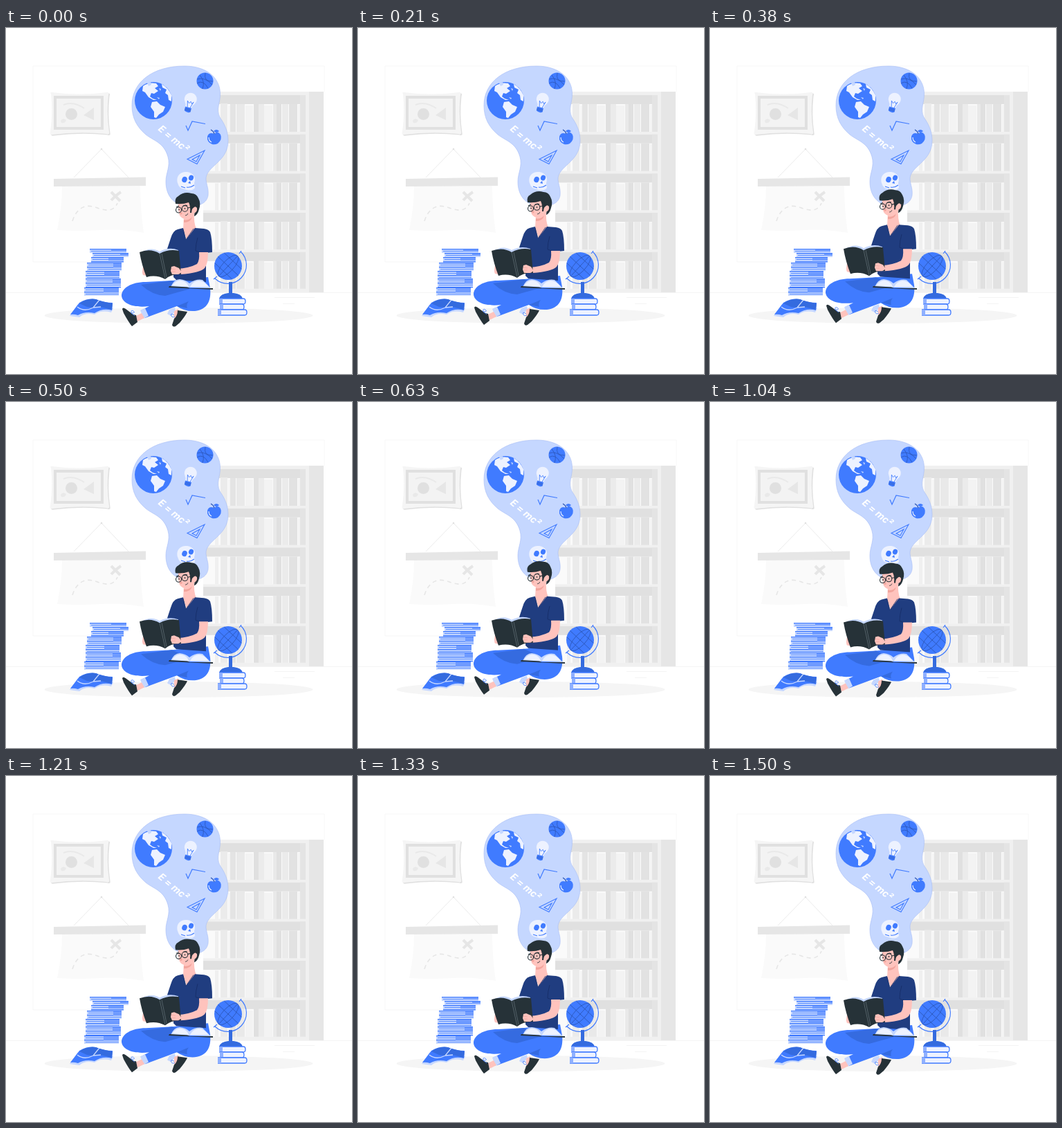
Animation, 500 px wide and 500 px high, one loop 1540 ms. Source, as an HTML page:

```html
<!DOCTYPE html>
<html lang="en">
<head>
<meta charset="utf-8">
<title>Reading</title>
<style>
  html, body { margin: 0; width: 100%; height: 100%; overflow: hidden; background: #fff; }
  svg { display: block; width: 100%; height: 100%; }
  .b { fill: #407bff; } .l { fill: #c5d7ff; } .d { fill: #263238; }
  .s { fill: #ffc3bd; } .n { fill: #203d80; } .w { fill: #edf2ff; }
  .line { fill: none; stroke: #407bff; }
  .ink { fill: none; stroke: #263238; }
</style>
</head>
<body>
<svg viewBox="0 0 500 500">
  <!-- room -->
  <path d="M39 338V55H460V92M39 338H118" fill="none" stroke="#f7f7f7"/>
  <path d="M0 382.500H500M388 389.500H446M400 398.500H417" stroke="#f0f0f0" stroke-width=".7"/>
  <ellipse cx="249.500" cy="415.500" rx="194" ry="11.500" fill="#f5f5f5"/>
  <g id="shelf"></g>

  <!-- framed picture -->
  <path id="frame" d="M65 95Q63 92 67 93Q106 98 145 93Q150 92 148 97Q145 124 149 150Q150 155 145 153Q106 149 68 154Q62 155 64 150Q68 124 65 95Z" fill="#e0e0e0" transform="translate(1.500 1.500)"/>
  <use href="#frame" x="-1.500" y="-1.500" style="filter:brightness(1.095)"/>
  <path d="M69 98H141V147H69Z" fill="#e0e0e0"/>
  <path d="M73 102H137V143H73Z" fill="#f3f3f3"/>
  <circle cx="94.500" cy="124.500" r="8.500" fill="#e0e0e0"/>
  <path d="M112 126L127 115V133Z" fill="#e6e6e6"/>
  <path d="M83 111Q97 105 113 116" fill="none" stroke="#e9e9e9" stroke-width="2"/>
  <path d="M79 134Q82 129 87 133Q86 138 80 137Z" fill="#e9e9e9"/>

  <!-- hanging map -->
  <path d="M98 216L138 175L177 216" fill="none" stroke="#e6e6e6" stroke-width=".8"/>
  <circle cx="138" cy="175" r="1.300" fill="#e0e0e0"/>
  <path d="M81 228H194Q194 262 199 296Q168 290 137 292Q104 294 74 292Q81 260 81 228Z" fill="#fafafa"/>
  <path d="M69 218L202 215.500V228L69 229Z" fill="#e6e6e6"/>
  <path d="M96 279C103 257 118 255 129 259S155 268 161 253" fill="none" stroke="#e6e6e6" stroke-width="1.600" stroke-dasharray="6 5"/>
  <path d="M152 237Q158 243 165 250M166 237Q158 242 152 249" stroke="#e6e6e6" stroke-width="4" fill="none"/>

  <!-- thought cloud -->
  <path d="M258 55C290 55 309 72 309.500 94C310 109 303 116 309 129C316 139 321 149 321 163C321 194 288 200 289 219C290 228 293 232 292 242C290 255 275 259 260 257C241 255 231 241 231 222C231 209 238 200 234 186C228 165 213 163 202 154C189 143 182 130 182 112C182 78 212 55 258 55Z" fill="#c5d7ff" stroke="#a6bdf5" stroke-width=".6"/>
  <circle class="b" cx="213" cy="105" r="27"/>
  <path class="w" d="M198 84Q206 78 217 80L220 84L215 87L220 91L214 95L210 94L208 99L212 102L218 104L213 104L206 100L201 93L197 91ZM225 81Q234 86 239 97L239 106L235 104L234 97L230 94L232 89L226 86ZM211 107L218 106L223 111L230 114L227 121L221 125L217 130L214 129V121L209 114Z"/>
  <path class="l" d="M204 79L209 78L210 82L206 84ZM221 87L224 88L223 91ZM218 100L222 101L221 103Z"/>
  <circle class="b" cx="287.500" cy="76.500" r="12"/>
  <path d="M276 74Q287 70 298 82M280 68Q288 77 284 88M288 65Q285 78 299 77M276 80Q285 74 292 87" fill="none" stroke="#2c56b5" stroke-width=".8"/>
  <g transform="rotate(14 266 107)">
    <path class="w" d="M261 115Q261 111 258.500 108A9 9 0 1 1 273 108Q270 111 270 115Z"/>
    <path class="b" d="M261 115H270V121Q266 124 261 121Z"/>
    <path class="line" d="M264 115L262 106L265 109L267 106L269 109L271 106L268 115" stroke-width=".8"/>
    <path d="M261 117.500H270M261 119.500H270" stroke="#2c56b5" stroke-width=".6"/>
  </g>
  <path class="line" d="M260 141L263 148L269 135L288 138.500" stroke-width="1.200"/>
  <path class="b" d="M301 153Q306 148 310 154Q313 161 306 167Q302 169 298 168Q290 165 291 157Q293 150 301 153Z"/>
  <path d="M301 153Q300 149 296 147" fill="none" stroke="#2c56b5" stroke-width="1.300"/>
  <path class="b" d="M300 149Q304 145 308 149Q304 153 300 149Z"/>
  <path d="M293 158Q293 163 297 165" fill="none" stroke="#edf2ff" stroke-width="1.200"/>
  <path class="line" d="M262 189.500L287 177L276 196.500ZM269 190L280 184L275 193Z" stroke-width="1.100"/>
  <text x="0" y="0" transform="translate(219 147) rotate(40)" fill="#fff" font-family="Inter, Arial, sans-serif" font-size="14" font-weight="700" font-style="italic">E = mc²</text>
  <path class="w" d="M248 224C245 212 254 207 262 208C271 209 275 217 272 224L273 231Q269 236 261 234L252 231Q249 228 248 224Z"/>
  <g class="b">
    <ellipse cx="258" cy="219" rx="3.700" ry="4.300" transform="rotate(20 258 219)"/>
    <ellipse cx="267.500" cy="216.500" rx="3.500" ry="4" transform="rotate(20 267.500 216.500)"/>
    <path d="M263 224L266 221L267 225Z"/>
  </g>
  <path class="line" d="M253 229L259 231M261 230Q267 231 272 227" stroke-width="1.100"/>

  <!-- books on the floor -->
  <g id="stack"></g>
  <path class="l" d="M92 416L104 399Q113 406 124 401L155 405L152 411Q138 407 128 414Q114 411 106 418Z"/>
  <path class="b" d="M93 414L106 397Q118 390 130 392Q142 397 154 397L153 408Q140 404 128 412Q114 409 104 415Q98 413 93 414Z"/>
  <path d="M106 398Q118 390 130 392Q136 395 154 398L153 407L136 403L125 404L117 403Z" fill="#346bdf"/>
  <path d="M103 403Q113 411 126 404L137 403M126 404L135 393" fill="none" stroke="#c5d7ff" stroke-width="1.300"/>

  <!-- globe -->
  <path class="line" d="M339 323A25.500 25.500 0 0 1 302 362M337 326L340 322M300 363L305 359" stroke-width="1.200"/>
  <path d="M322 367H327V386H322Z" fill="#346bdf"/>
  <circle class="b" cx="321" cy="344" r="20"/>
  <g fill="none" stroke="#2c56b5" stroke-width=".8" transform="rotate(43 321 344)">
    <ellipse cx="321" cy="344" rx="8" ry="20"/>
    <path d="M321 324V364M301 344H341M304 334H338M304 354H338"/>
  </g>
  <path d="M308 391Q310 384 321 383H329Q340 384 342 391Z" fill="#346bdf"/>
  <g id="pile"></g>

  <!-- reader -->
  <g id="man">
    <path class="s" d="M198 345L204 348L203 358L198 357Q196 354 198 345Z"/>
    <path class="s" d="M257 273L272 265Q271 282 275 290L262 308L256 291Z"/>
    <path d="M257 277Q263 279 269 273Q267 281 257 281Z" fill="#f2a59d"/>
    <path class="s" d="M249 252Q248 264 251 271Q255 277 262 276Q269 275 272 267Q279 268 278 260Q276 248 264 247Z"/>
    <path class="d" d="M245 254Q243 246 249 243Q257 236 268 239Q275 239 278 246Q282 253 279 262Q277 270 272 272L273 262Q269 257 268 267L266 267Q267 258 264 252Q256 255 245 254Z"/>
    <path class="s" d="M270 261Q273 256 276 260Q277 266 271 268Z"/>
    <g class="ink" stroke-width="1.100">
      <circle cx="249.500" cy="263" r="4"/><circle cx="258.500" cy="261" r="4.300"/>
      <path d="M262.500 260L272 258M256 257.500Q259 255 262 257M246 259L250 257"/>
      <path d="M259 271Q262 271 263 268" stroke-width=".8"/>
    </g>
    <circle class="d" cx="250" cy="262.500" r=".9"/><circle class="d" cx="258.500" cy="261" r=".9"/>
    <circle cx="253" cy="268" r="1.600" fill="#f2a59d"/>

    <path class="b" d="M240 365L202 367C181 367 167 376 167 387C168 398 184 405 207 402L195 408L201 419L247 402Q258 410 273 409C291 407 297 394 295 376L292 360Z"/>
    <path d="M195 371L240 365L266 377L230 387Q211 386 195 371ZM247 402L264 395Q260 400 262 405Z" fill="#356be0"/>
    <path class="l" d="M194 408L201 405L206 416L199 420ZM236 407L244 404L245 409L238 416L233 413Z"/>
    <path class="s" d="M188 416L196 412L200 419L190 424ZM243 409L249 406L250 413L243 420Z"/>
    <path class="d" d="M168 406Q169 403 173 406L181 412Q184 415 188 415L190 425L182 431Q177 425 170 412Z"/>
    <path class="d" d="M248 408L262 410Q260 415 251 426L245 431Q241 433 240 429L243 420Q248 416 248 408Z"/>
    <path class="line" d="M181 412Q180 407 184 409Q188 412 181 412L186 416M243 415Q237 411 239 416Q240 419 244 417" stroke-width=".8"/>

    <path class="n" d="M256 289L248 291Q241 293 238 304L233 319L243 329L242 360L246 364L289 367V325L298 324Q298 304 295 295Q293 291 286 290L273 289L260 306Z"/>
    <path d="M277 303Q274 313 274 322L280 324M271 290L260 306L256 291" fill="none" stroke="#162d66" stroke-width=".8"/>
    <path class="s" d="M279 324L292 324Q292 341 287 347Q280 354 252 356L244 355L247 348Q265 347 276 341Q280 336 279 324Z"/>

    <path class="l" d="M194 325Q209 315 222 323Q236 316 249 321V326L222 330Z"/>
    <path class="d" d="M193 324Q209 318 222 326Q235 319 250 322L253 356Q240 355 230 363Q217 356 203 360Q196 342 193 324Z"/>
    <path d="M222 326L230 362M225 326L232 360" fill="none" stroke="#66747b" stroke-width=".7"/>
    <path class="s" d="M250 347L243 344L239 345L238 351L240 356L249 356L254 353Z"/>
    <path d="M239 348L245 349M240 352L245 352" stroke="#f2a59d" stroke-width=".7"/>
  </g>

  <!-- book on the lap -->
  <path class="l" d="M238 374Q243 363 251 363Q260 364 265 369Q275 362 284 364L296 376Z"/>
  <path class="w" d="M240 372Q247 363 254 365Q262 367 264 374ZM266 374Q270 366 278 365Q286 365 293 374Z"/>
  <path class="d" d="M236 373L262 374.500L266 376L299 376V378L235 375Z"/>
</svg>
<script>
const byId = id => document.getElementById(id);
const rect = (x, y, w, h, fill) =>
  `<rect x="${x}" y="${y}" width="${w}" height="${h}" fill="${fill}"/>`;

function drawShelf() {
  let out = rect(285, 92, 153, 290, '#f0f0f0') + rect(438, 92, 21, 290, '#e6e6e6');
  // x, width, grey level, height
  const books = [[302, 5, 'f0', 39], [310, 10, 'ebebeb', 41], [321, 3, 'f5f5f5', 38],
    [324, 8, 'e4e4e4', 40], [333, 12, 'e9e9e9', 40], [346, 11, 'f3f3f3', 38],
    [358, 7, 'e0e0e0', 41], [365, 8, 'ebebeb', 40], [373, 12, 'f3f3f3', 38],
    [386, 5, 'e9e9e9', 40], [391, 7, 'e0e0e0', 40], [399, 9, 'ebebeb', 40],
    [409, 12, 'e2e2e2', 40], [422, 3, 'f3f3f3', 39]];
  for (let row = 0; row < 5; row++) {
    const top = 97 + row * 56.7;
    out += rect(285, top, 148, 53, '#fafafa') + rect(285, top, 148, 13, '#e0e0e0');
    for (const [x, w, grey, h] of books)
      out += rect(x, top + 53 - h, w, h, '#' + (grey.length < 6 ? 'f0f0f0' : grey));
    out += rect(425, top, 8, 53, '#e4e4e4');
  }
  byId('shelf').innerHTML = out;
}

function drawStack() {
  const books = [[121, 174, 319, 6], [125, 177, 325, 6], [123, 170, 331, 8], [117, 167, 339, 12],
    [115, 164, 351, 11], [115, 166, 362, 13], [113, 163, 375, 12]];
  byId('stack').innerHTML = books.map(([x, end, y, h], i) => {
    const w = end - x;
    let out = rect(x, y, w, h, '#c5d7ff');
    for (let k = 0; k < h; k += 3)
      out += rect(x + k % 2 * 2, y + k, w - k % 2 * 2, k % 2 ? .8 : 1.3, '#407bff');
    return out + rect(i % 2 ? end - 12 : end - 22, y + 1, i % 2 ? 12 : 22, h / 2, '#6f9bff');
  }).join('');
}

function drawPile() {
  byId('pile').innerHTML = [[308, 346, 391], [309, 344, 399], [306, 348, 407]].map(([x, end, y]) =>
    `<path d="M${x} ${y}H${end - 3}Q${end} ${y} ${end} ${y + 4}T${end - 3} ${y + 8}H${x}" fill="#edf2ff" stroke="#407bff" stroke-width="1.300"/>` +
    rect(x, y, 5, 8, '#8fb0ff')).join('');
}

drawShelf();
drawStack();
drawPile();

const LOOP = 1540, PEAK = 730, RISE = 8.5;
const man = byId('man');
function tick() {
  const t = performance.now() % LOOP;
  const lift = RISE * (1 + Math.cos(2 * Math.PI * (t - PEAK) / LOOP)) / 2;
  man.setAttribute('transform', `translate(0 ${-lift.toFixed(2)})`);
  requestAnimationFrame(tick);
}
tick();
</script>
</body>
</html>
```
